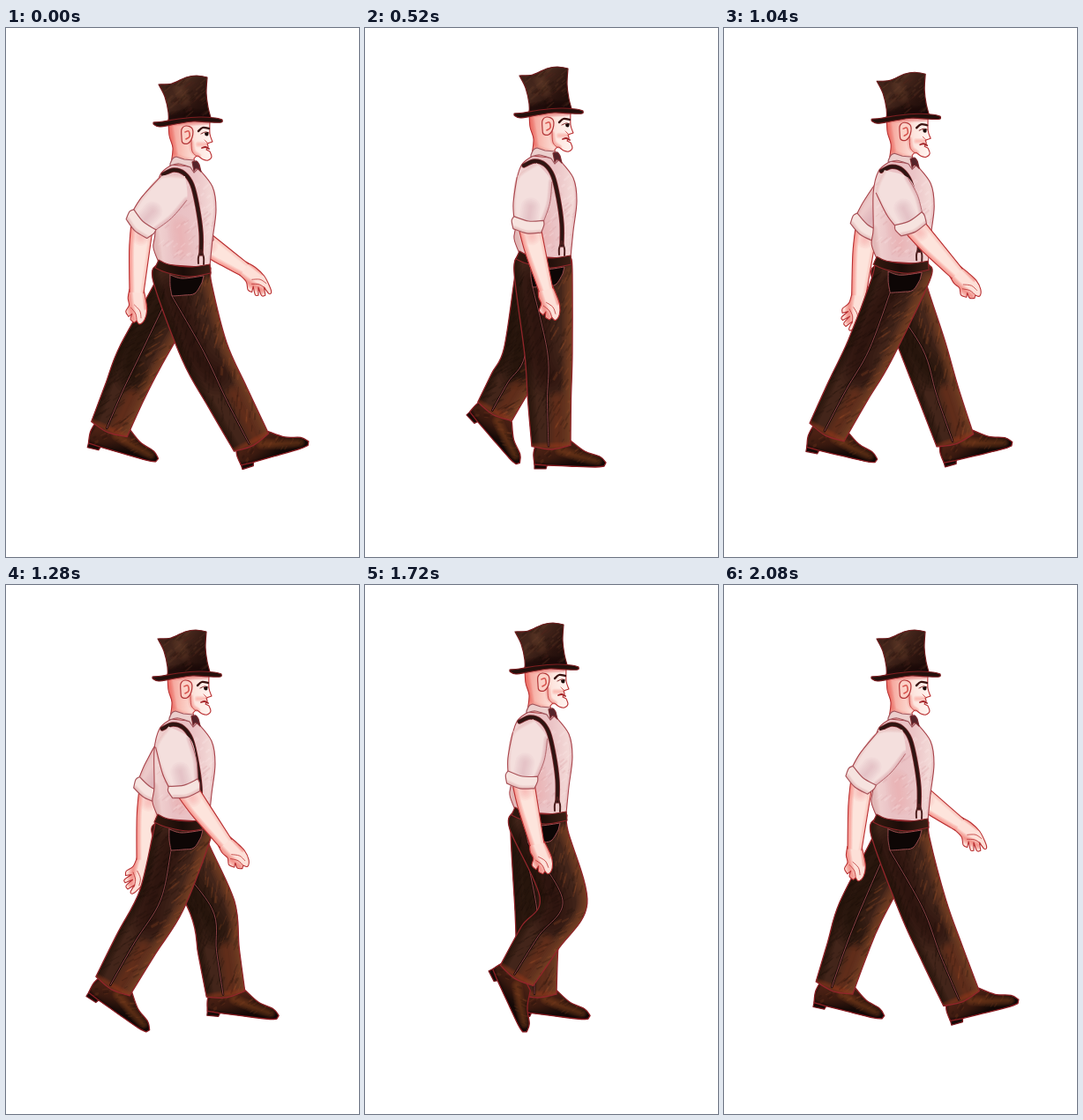
Animation, 400 px wide and 600 px high, one loop 2.12 s. Source, as an HTML page with a canvas:

```html
<!DOCTYPE html>
<html lang="en">
<head>
<meta charset="utf-8">
<title>Walking man</title>
<style>
html, body { margin: 0; width: 100%; height: 100%; overflow: hidden; background: #fff; }
canvas { display: block; width: 400px; height: 600px; }
</style>
</head>
<body>
<canvas id="stage" width="400" height="600"></canvas>
<script>
const ctx = document.getElementById('stage').getContext('2d');
const LOOP = 2120, STEP = 40;
const RED = '#a5262a', PINK = '#b9747c', INK = '#170a07';

// time, sideways shift, bob
const BODY = [
  [0, 0, 0], [200, 0, 0], [360, 1, -5], [520, 2, -10], [680, 2, -13], [840, 2, -12],
  [1060, 0, -3], [1160, -1, -1], [1280, -1, -3], [1500, -2, -7], [1720, -3, -11],
  [1880, -2, -13], [2080, 0, -3]
];
// time, knee, ankle, foot angle
const NEAR_LEG = [
  [0, 225, 367, 278, 470, -18], [200, 238, 365, 251, 473, 0], [520, 208, 370, 211, 474, 0],
  [840, 182, 362, 154, 466, 6], [1120, 162, 366, 107, 456, 15], [1280, 176, 358, 121, 455, 33],
  [1580, 204, 363, 152, 438, 52], [1720, 225, 358, 172, 443, 63], [1900, 242, 350, 222, 457, 14],
  [2080, 226, 366, 269, 469, -16]
];
const FAR_LEG = [
  [0, 152, 373, 117, 455, 14], [110, 148, 369, 98, 450, 21], [200, 149, 365, 103, 445, 36],
  [520, 182, 372, 147, 435, 47], [660, 211, 358, 172, 443, 52], [840, 225, 350, 214, 460, 9],
  [1060, 226, 364, 264, 468, -16], [1280, 234, 366, 249, 464, 5], [1500, 216, 368, 222, 466, 3],
  [1720, 196, 370, 195, 464, 5], [2080, 155, 370, 125, 457, 12]
];
// time, elbow, wrist, hand angle
const NEAR_ARM = [
  [0, 154, 221, 148, 300, 88], [200, 165, 222, 151, 300, 110], [520, 185, 221, 205, 297, 76],
  [840, 206, 220, 255, 281, 54], [1060, 211, 221, 264, 279, 48], [1280, 202, 229, 249, 293, 50],
  [1500, 190, 226, 222, 296, 66], [1720, 178, 219, 195, 294, 72], [2080, 156, 220, 148, 300, 86]
];
const FAR_ARM = [
  [0, 217, 238, 270, 274, 40], [200, 224, 238, 260, 288, 66], [520, 194, 228, 206, 292, 78],
  [840, 170, 221, 168, 288, 106], [1060, 161, 225, 152, 305, 102], [1280, 163, 231, 156, 312, 108],
  [1500, 176, 228, 176, 296, 90], [1720, 196, 228, 208, 290, 75], [2080, 216, 234, 267, 272, 40]
];

// Cyclic cubic interpolation through uneven keys
function sample(keys, t) {
  const n = keys.length;
  let i = n - 1;
  while (keys[i][0] > t) i--;
  const at = k => {
    const row = keys[(k + n) % n].slice();
    row[0] += LOOP * Math.floor(k / n);
    return row;
  };
  const [a, b, c, d] = [i - 1, i, i + 1, i + 2].map(at);
  const span = c[0] - b[0], s = (t - b[0]) / span, s2 = s * s, s3 = s2 * s;
  return b.slice(1).map((v, j) => {
    const k = j + 1;
    const m1 = (c[k] - a[k]) / (c[0] - a[0]) * span;
    const m2 = (d[k] - b[k]) / (d[0] - b[0]) * span;
    return (2 * s3 - 3 * s2 + 1) * v + (s3 - 2 * s2 + s) * m1
      + (3 * s2 - 2 * s3) * c[k] + (s3 - s2) * m2;
  });
}

function random(seed) {
  return () => (seed = (seed * 16807) % 2147483647) / 2147483647;
}

const add = (p, v, k = 1) => [p[0] + v[0] * k, p[1] + v[1] * k];
const mix = (p, q, k) => [p[0] + (q[0] - p[0]) * k, p[1] + (q[1] - p[1]) * k];
const unit = (p, q) => {
  const x = q[0] - p[0], y = q[1] - p[1], l = Math.hypot(x, y) || 1;
  return [x / l, y / l];
};
const side = d => [d[1], -d[0]];
const pairs = (...v) => v.reduce((r, x, i) => (i % 2 ? r[r.length - 1].push(x) : r.push([x]), r), []);

// Smooth open run through points
function run(path, pts, join) {
  path[join ? 'lineTo' : 'moveTo'](...pts[0]);
  for (let i = 0; i < pts.length - 1; i++) {
    const a = pts[i - 1] || pts[i], b = pts[i], c = pts[i + 1], d = pts[i + 2] || c;
    path.bezierCurveTo(b[0] + (c[0] - a[0]) / 6, b[1] + (c[1] - a[1]) / 6,
      c[0] - (d[0] - b[0]) / 6, c[1] - (d[1] - b[1]) / 6, ...c);
  }
  return path;
}
const line = (...v) => run(new Path2D(), pairs(...v));
const curve = pts => run(new Path2D(), pts);
// Closed shape whose runs meet in corners
function shape(...runs) {
  const path = new Path2D();
  runs.forEach((r, i) => run(path, r, i > 0));
  path.closePath();
  return path;
}

function stroke(path, color, width = 1) {
  ctx.strokeStyle = color;
  ctx.lineWidth = width;
  ctx.stroke(path);
}
function paint(path, fill, color = RED, width = 1.2) {
  ctx.fillStyle = fill;
  ctx.fill(path);
  if (color) stroke(path, color, width);
}
function inside(path, draw) {
  ctx.save();
  ctx.clip(path);
  draw();
  ctx.restore();
}
function soft(path, color, width, alpha = 0.5) {
  ctx.save();
  ctx.globalAlpha = alpha / 4;
  for (let k = 1; k <= 6; k++) stroke(path, color, width * k / 6);
  ctx.restore();
}
function gradient(x0, y0, x1, y1, ...colors) {
  const g = ctx.createLinearGradient(x0, y0, x1, y1);
  colors.forEach((c, i) => g.addColorStop(i / (colors.length - 1), c));
  return g;
}
function hatch(seed, count, box, colors, len) {
  const rnd = random(seed);
  ctx.save();
  ctx.globalAlpha = 0.2;
  for (let i = 0; i < count; i++) {
    const x = box[0] + rnd() * box[2], y = box[1] + rnd() * box[3], l = len * (0.4 + rnd());
    stroke(line(x, y, x + l * 0.7, y - l * 0.6), colors[i % colors.length], 1 + rnd() * 1.5);
  }
  ctx.restore();
}

function shoe([x, y], angle) {
  ctx.save();
  ctx.translate(x, y);
  ctx.rotate(angle * Math.PI / 180);
  paint(shape(pairs(-19, 18, -19, 26), pairs(-6, 26, -4, 20)), INK, '#7d1a20');
  const upper = shape(pairs(-16, -6, -20, 8, -19, 21), pairs(-6, 22, 20, 23, 50, 24, 60, 23),
    pairs(62, 19, 55, 12, 38, 6, 22, -6));
  paint(upper, gradient(0, 0, 8, 26, '#4b2114', '#39190f', '#120806'), null);
  inside(upper, () => {
    soft(line(10, 5, 32, 12, 52, 17), '#7b3c20', 13, 0.6);
    soft(line(-20, 2, -17, 22, 58, 25), INK, 9, 0.7);
    hatch(31, 34, [-18, -2, 78, 24], ['#8c4526', INK], 5);
  });
  stroke(upper, '#8c1f24', 1.3);
  ctx.restore();
}

function leg(hip, back, front, pose, far) {
  const [kx, ky, ax, ay, angle] = pose;
  const knee = [kx, ky], ankle = [ax, ay];
  const thigh = unit(hip, knee), shin = unit(knee, ankle);
  const nk = side(unit([0, 0], add(thigh, shin))), na = side(shin);
  const wk = far ? 26 : 27, wa = 22;
  const kb = add(knee, nk, -wk), kf = add(knee, nk, wk);
  const hb = add(ankle, na, -wa), hf = add(ankle, na, wa);
  const calf = mix(knee, ankle, 0.5);
  const cb = add(calf, na, -wk + 2), cf = add(calf, na, wk - 3);
  const backEdge = [back[0], back[1], kb, cb, hb], frontEdge = [hf, cf, kf, front[1], front[0]];
  const trousers = shape(backEdge, [hb, add(ankle, shin, 4), hf], frontEdge);

  shoe(ankle, angle);
  paint(trousers, '#43251a', null);
  inside(trousers, () => {
    const hipIn = add(hip, [-12, 12]);
    soft(curve([hipIn, add(knee, nk, -10), mix(knee, ankle, 0.25)]), INK, 46, far ? 0.5 : 0.38);
    soft(curve(backEdge), INK, 18, 0.45);
    soft(curve([front[1], kf, cf, hf]), '#96502a', 24, 0.5);
    soft(curve([add(calf, na, 8), add(ankle, na, 6)]), '#7d3a1f', 22, 0.45);
    soft(curve([hb, ankle, hf]), '#9a3a22', 9, 0.4);
    const rnd = random(far ? 77 : 19);
    ctx.globalAlpha = 0.2;
    for (let i = 0; i < 230; i++) {
      const u = rnd() * 2, v = rnd() * 2 - 1;
      const p = u < 1 ? mix(hip, knee, u) : mix(knee, ankle, u - 1);
      const n = u < 1 ? side(thigh) : na, d = u < 1 ? thigh : shin;
      const a = add(p, n, v * 30), len = 3 + rnd() * 8;
      const b = add(add(a, d, -len), n, len * 0.6);
      stroke(curve([a, b]), v > 0.1 && i % 2 ? '#a8542b' : INK, 1 + rnd() * 1.2);
    }
  });
  const seam = [add(hip, [-13, 18]), add(knee, nk, -1), add(calf, na, -3), add(ankle, na, -3)];
  stroke(curve(seam), INK, 2.6);
  stroke(curve(seam), '#ac5557', 0.8);
  stroke(trousers, '#92252a', 1.3);
}

function hand([x, y], angle, open) {
  ctx.save();
  ctx.translate(x, y);
  ctx.rotate(angle * Math.PI / 180);
  const palm = open
    ? shape(pairs(-4, -8, 8, -10, 22, -9, 34, -4, 40, 0, 39, 3, 30, 1), pairs(37, 7, 34, 10, 25, 5),
      pairs(31, 12, 28, 14, 20, 8), pairs(23, 14, 18, 15, 10, 9, -4, 8))
    : shape(pairs(-4, -8, 8, -10, 20, -11, 31, -8, 36, -2, 32, 1), pairs(34, 4, 30, 8, 24, 6),
      pairs(27, 10, 21, 13, 14, 9, 6, 10, -4, 8));
  paint(palm, '#fde0d8', null);
  inside(palm, () => {
    soft(line(0, 9, 14, 8, 30, 5), '#e7564e', 10, 0.5);
    soft(line(-2, -9, 18, -10), '#e7564e', 6, 0.4);
  });
  stroke(palm, '#b92f31', 1.1);
  stroke(line(17, 7, 24, 2, 32, 1), '#c24040', 0.9);
  stroke(line(14, 3, 21, -3, 29, -4), '#c24040', 0.8);
  ctx.restore();
}

function arm(shoulder, pose, far) {
  const [ex, ey, wx, wy, angle] = pose;
  const elbow = [ex, ey], wrist = [wx, wy];
  const up = unit(shoulder, elbow), low = unit(elbow, wrist);
  const n = side(up), m = side(low), mid = mix(elbow, wrist, 0.4);

  hand(wrist, angle, far);
  const outer = [add(elbow, m, -12), add(mid, m, -12), add(wrist, m, -8)];
  const inner = [add(wrist, m, 8), add(mid, m, 11), add(elbow, m, 13)];
  const skin = shape(outer, inner);
  paint(skin, '#fde4dc', null);
  inside(skin, () => {
    soft(curve(outer), '#ea5c53', 11, 0.5);
    soft(curve(inner), '#f0988f', 8, 0.4);
    soft(curve([elbow, add(elbow, low, 16)]), '#ee8a80', 20, 0.3);
  });
  stroke(curve(outer), '#b92f31', 1.1);
  stroke(curve(inner), '#b92f31', 1.1);

  const rear = [add(shoulder, up, -19), add(shoulder, n, -20), add(mix(shoulder, elbow, 0.6), n, -20), add(elbow, n, -16)];
  const fore = [add(elbow, n, 16), add(mix(shoulder, elbow, 0.5), n, 21), add(shoulder, n, 20), add(shoulder, up, -19)];
  const sleeve = shape(rear, fore);
  paint(sleeve, far ? '#ecc9c9' : '#f4dfdd', null);
  inside(sleeve, () => {
    soft(curve(fore.slice(0, 3)), '#c98a92', 9, 0.4);
    soft(curve(rear), '#d4a0a5', 7, 0.35);
    soft(curve([add(elbow, up, -6), add(elbow, up, -18)]), '#c0969c', 22, 0.3);
  });
  stroke(curve(rear.slice(far ? 0 : 1)), '#a8434a', 1.1);
  stroke(curve(fore.slice(0, 3)), '#b4676d', 1);

  const a = add(elbow, up, -5), b = add(elbow, up, 9);
  const cuff = shape([add(a, n, -17), add(elbow, n, -19), add(b, n, -16)],
    [add(b, n, -16), add(b, up, 3), add(b, n, 16)],
    [add(b, n, 16), add(elbow, n, 18), add(a, n, 17)], [add(a, n, 17), add(a, up, 3), add(a, n, -17)]);
  paint(cuff, '#f6e3df', null);
  inside(cuff, () => soft(curve([add(b, n, -14), add(b, up, 3), add(b, n, 16)]), '#d99d9f', 8, 0.5));
  stroke(cuff, '#a95359', 1.2);
}

function head() {
  const face = shape(pairs(184, 104, 185, 122, 189, 136, 187, 154), pairs(200, 158, 215, 160),
    pairs(213, 148, 217, 145, 223, 149, 229, 150, 233, 146, 231, 140), pairs(227, 138, 229, 135, 228, 131),
    pairs(234, 129, 231, 120, 231, 104));
  paint(face, gradient(184, 0, 232, 0, '#f3958c', '#f9c2b8', '#fde6df', '#fff3ef'), null);
  inside(face, () => {
    soft(line(184, 106, 187, 124, 190, 142), '#e64f49', 10, 0.45);
    soft(line(188, 108, 228, 107), '#d84a45', 7, 0.4);
    soft(line(190, 145, 200, 150, 214, 153), '#ec7e75', 10, 0.4);
    soft(line(210, 130, 212, 140, 218, 145), '#ef8b82', 7, 0.5);
    soft(line(218, 132, 227, 132), '#ef8b82', 7, 0.4);
  });
  stroke(face, '#b92f31', 1.1);
  stroke(line(210, 127, 211, 140, 217, 146), '#c94c4a', 1);
  const ear = line(199, 124, 199, 115, 204, 111, 211, 114, 211, 124, 206, 131, 200, 130, 199, 124);
  paint(ear, '#fbd0c6', '#b23436');
  stroke(line(203, 118, 207, 117, 208, 123, 204, 126), '#d8554f', 1.6);
  stroke(line(218, 117, 223, 113, 230, 114), '#3a1210', 2.3);
  stroke(line(221, 120, 226, 118, 230, 119), '#7a2020', 1);
  paint(line(225, 119, 229, 118, 229, 122, 226, 122, 225, 119), '#1b0b0a', null);
  stroke(line(222, 136, 226, 135, 230, 137), '#a12327', 1.8);
  stroke(line(225, 127, 229, 131), '#cf5a55', 1);
}

function hat() {
  const crown = shape(pairs(173, 64, 188, 63, 204, 56, 216, 54, 228, 56), pairs(228, 56, 227, 74, 229, 90, 233, 105),
    pairs(233, 105, 210, 104, 184, 109), pairs(184, 109, 184, 96, 180, 78, 173, 64));
  paint(crown, gradient(175, 60, 232, 105, '#3b1f17', '#46281d', '#2a130e', '#170a08'), null);
  inside(crown, () => {
    soft(line(183, 102, 208, 98, 232, 99), INK, 13, 0.7);
    soft(line(196, 68, 203, 82), '#5f3b2c', 16, 0.4);
    hatch(53, 90, [174, 56, 58, 46], ['#72452f', INK, '#52251c'], 8);
  });
  stroke(crown, '#6e1b1c', 1.2);
  const brim = shape(pairs(167, 107, 178, 106, 196, 103, 220, 101, 237, 102, 245, 104),
    pairs(245, 104, 244, 107, 232, 107, 212, 106, 192, 109, 174, 112, 167, 109));
  paint(brim, '#23100c', '#7d1d20');
}

function shirt() {
  const body = shape(pairs(188, 155, 175, 166, 169, 190, 169, 232, 167, 249, 174, 268), pairs(174, 274, 231, 278),
    pairs(231, 270, 234, 240, 238, 206, 234, 180, 217, 158));
  paint(body, gradient(168, 0, 238, 0, '#f2d6d4', '#e9c0c3', '#ebc4c6', '#f5dedb'), null);
  inside(body, () => {
    soft(line(168, 232, 172, 268), '#cf8f96', 12, 0.4);
    soft(line(196, 225, 200, 250), '#d9959d', 28, 0.28);
    soft(line(236, 180, 238, 206, 232, 262), '#d9a0a2', 7, 0.4);
    hatch(11, 80, [172, 180, 62, 84], ['#cf8f98', '#fff0ee'], 7);
  });
  stroke(body, '#a8434a', 1.1);
  paint(shape(pairs(186, 154, 189, 148, 193, 146), pairs(202, 149, 213, 150), pairs(217, 160, 213, 164),
    pairs(209, 158, 196, 154, 186, 156)), '#eccfcd', '#a0565d');
  paint(shape(pairs(211, 152, 216, 151, 219, 155), pairs(221, 163, 216, 159, 213, 162)), '#54242a', '#7c2a30');
}

function braces() {
  const strap = line(178, 166, 190, 161, 202, 165, 211, 178, 217, 203, 221, 232, 221, 256);
  stroke(strap, '#7d2c30', 5.4);
  stroke(strap, '#2f1512', 3.8);
  stroke(line(221, 252, 218, 260, 218, 267), '#4d1f1e', 2);
  stroke(line(221, 252, 224, 260, 224, 268), '#4d1f1e', 2);
}

function waist() {
  paint(shape(pairs(186, 280, 200, 284, 224, 281), pairs(222, 289, 214, 301, 202, 303, 188, 304), pairs(188, 304, 186, 292, 186, 280)),
    '#0d0605', '#9a4b4e', 1);
  const belt = shape(pairs(173, 263, 184, 268, 208, 271, 231, 268), pairs(231, 268, 232, 278),
    pairs(232, 278, 208, 282, 184, 278, 169, 272));
  paint(belt, gradient(170, 0, 232, 0, '#33190f', '#1b0c08', '#3d1f15'), '#8d2428', 1.2);
}

function draw(t) {
  const [dx, dy] = sample(BODY, t);
  const at = (x, y) => [x + dx, y + dy];
  const onBody = (...parts) => {
    ctx.save();
    ctx.translate(dx, dy);
    parts.forEach(part => part());
    ctx.restore();
  };
  ctx.fillStyle = '#fff';
  ctx.fillRect(0, 0, 400, 600);
  arm(at(196, 184), sample(FAR_ARM, t), true);
  leg(at(196, 288), [at(172, 272), at(168, 290)], [at(228, 272), at(228, 290)], sample(FAR_LEG, t), true);
  onBody(head, shirt);
  leg(at(201, 286), [at(171, 268), at(167, 288)], [at(232, 272), at(233, 290)], sample(NEAR_LEG, t), false);
  onBody(waist, braces);
  arm(at(190, 182), sample(NEAR_ARM, t), false);
  onBody(hat);
}

ctx.lineCap = ctx.lineJoin = 'round';
const start = performance.now();
let shown = -1;
function tick() {
  const t = Math.floor((performance.now() - start) / STEP) * STEP % LOOP;
  if (t !== shown) draw(shown = t);
  requestAnimationFrame(tick);
}
tick();
</script>
</body>
</html>
```
